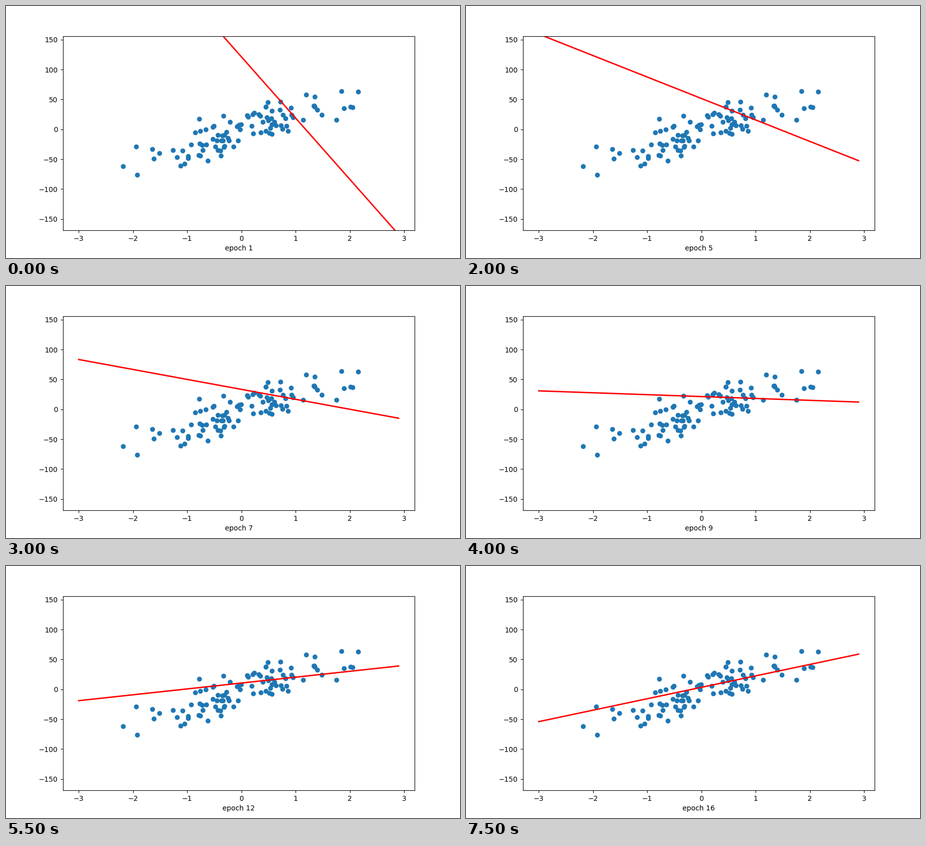
Write a matplotlib script that moves like this. It is 900 px wide and 500 px high and loops after 8000 ms.

```python
import numpy as np
import matplotlib.pyplot as plt
from matplotlib.animation import FuncAnimation

EPOCHS = 16
RATE = 0.001


def make_data(n=100, noise=20, seed=13):
    """Noisy linear data with a random slope."""
    rng = np.random.RandomState(seed)
    x = rng.standard_normal(n)
    slope = 100 * rng.uniform()
    return x, slope * x + rng.normal(scale=noise, size=n)


def descend(x, y, m=-127.82, b=150):
    """Slope and intercept after each step of batch gradient descent."""
    path = []
    for _ in range(EPOCHS):
        err = y - m * x - b
        m, b = m + 2 * RATE * np.sum(err * x), b + 2 * RATE * np.sum(err)
        path.append((m, b))
    return path


x, y = make_data()
path = descend(x, y)
grid = np.arange(-3, 3, 0.1)

plt.rcParams["font.family"] = "DejaVu Sans"
fig, ax = plt.subplots(figsize=(9, 5), dpi=100)
ax.scatter(x, y)
line, = ax.plot(grid, 50 * grid - 4, "r-", linewidth=2)
ax.set_xlim(-3.295, 3.195)
ax.set_ylim(-168.75, 155.75)


def update(i):
    m, b = path[i]
    line.set_ydata(m * grid + b)
    ax.set_xlabel(f"epoch {i + 1}")
    return line,


anim = FuncAnimation(fig, update, frames=EPOCHS, interval=500, repeat=True, repeat_delay=0)
plt.show()
```
